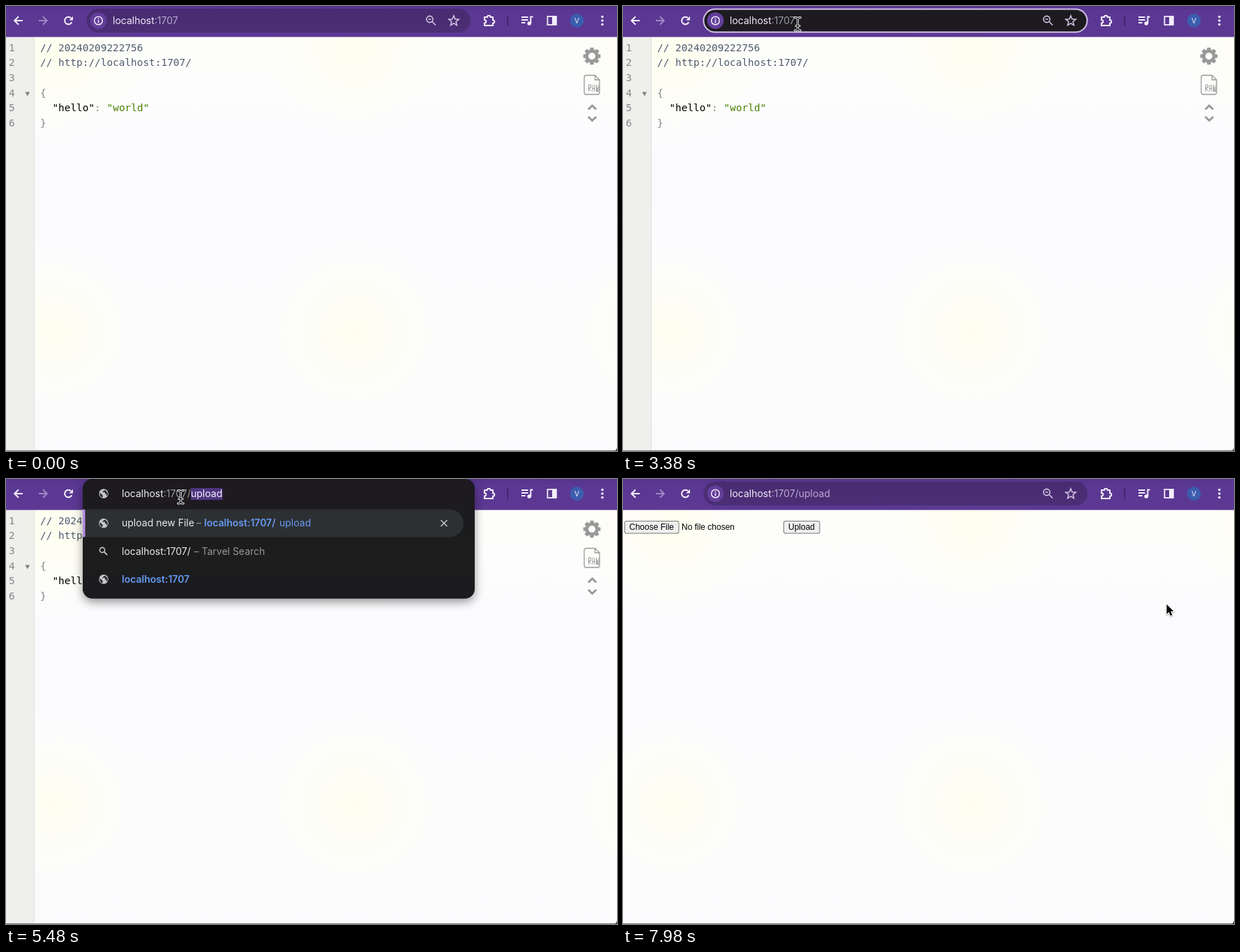
These frames come from a looping animation (876x639 px, 8000 ms). An HTML page with a canvas:

```html
<!DOCTYPE html>
<html lang="en">
<head>
<meta charset="utf-8">
<title>Upload page</title>
<style>
html, body { margin: 0; width: 100%; height: 100%; overflow: hidden; background: #fcfcfe; }
canvas { display: block; }
</style>
</head>
<body>
<canvas id="stage" width="876" height="639"></canvas>
<script>
const W = 876, H = 639, LOOP = 8000;
const CLICK = 1540, TYPE = 4570, ENTER = 6220, LOAD = 6480;
const UI = '14px Inter, sans-serif';
const UI_BOLD = '600 14px Inter, sans-serif';
const CODE = '14.42px "DejaVu Sans Mono", monospace';
const FORM = '12px "Liberation Sans", Arial, sans-serif';
const screen = document.getElementById('stage').getContext('2d');
let ctx = screen;

const clamp = v => Math.max(0, Math.min(1, v));
const ease = v => { v = clamp(v); return v * v * (3 - 2 * v); };
const mix = (a, b, p) => a + (b - a) * p;

function text(str, x, y, color, font) {
  ctx.font = font;
  ctx.fillStyle = color;
  ctx.fillText(str, x, y);
}
function rect(x, y, w, h, color) {
  ctx.fillStyle = color;
  ctx.fillRect(x, y, w, h);
}
function box(x, y, w, h, r, color) {
  ctx.fillStyle = color;
  ctx.beginPath();
  ctx.roundRect(x, y, w, h, r);
  ctx.fill();
}
function disc(x, y, r, color) {
  ctx.fillStyle = color;
  ctx.beginPath();
  ctx.arc(x, y, r, 0, 7);
  ctx.fill();
}
function line(d, color, width = 1.8) {
  ctx.strokeStyle = color;
  ctx.lineWidth = width;
  ctx.stroke(new Path2D(d));
}
function shape(d, color) {
  ctx.fillStyle = color;
  ctx.fill(new Path2D(d));
}
function ring(x, y, r, color, width) {
  ctx.strokeStyle = color;
  ctx.lineWidth = width;
  ctx.beginPath();
  ctx.arc(x, y, r, 0, 7);
  ctx.stroke();
}
function fadeY(y0, y1, stops) {
  const g = ctx.createLinearGradient(0, y0, 0, y1);
  stops.forEach(([at, color]) => g.addColorStop(at, color));
  return g;
}

function backdrop() {
  rect(0, 44, W, H - 44, fadeY(44, H, [[0, '#fefefb'], [.3, '#fbfbff'], [.72, '#fcfcfd'], [1, '#fbfbfd']]));
  for (const [x, y, r] of [[70, 465, 120], [500, 465, 130], [930, 465, 120], [500, 60, 130], [70, 70, 130], [930, 70, 120]]) {
    const g = ctx.createRadialGradient(x, y, 0, x, y, r);
    g.addColorStop(0, 'rgba(255,255,236,.8)');
    g.addColorStop(1, 'rgba(255,255,240,0)');
    ctx.fillStyle = g;
    ctx.fillRect(x - r, Math.max(44, y - r), 2 * r, 2 * r);
  }
}

function gear(x, y) {
  ctx.beginPath();
  for (let i = 0; i < 8; i++) {
    const a = i * Math.PI / 4;
    for (const [da, r] of [[-.3, 9.7], [-.2, 12.6], [.2, 12.6], [.3, 9.7]])
      ctx.lineTo(x + r * Math.cos(a + da), y + r * Math.sin(a + da));
  }
  ctx.closePath();
  ctx.moveTo(x + 5, y);
  ctx.arc(x, y, 5, 0, 7);
  ctx.fillStyle = '#999';
  ctx.fill('evenodd');
}

function jsonPage() {
  rect(0, 44, 40, H - 44, 'rgba(235,235,232,.72)');
  rect(40, 44, 1, H - 44, '#dddddf');
  const row = i => 64.6 + i * 21.72;
  for (let i = 0; i < 6; i++) text(String(i + 1), 4, row(i), '#85858a', CODE);
  shape('M27.5 123.5h6.6l-3.3 6z', '#808080');
  text('// 20240209222756', 49, row(0), '#4f5b6f', CODE);
  text('// http://localhost:1707/', 49, row(1), '#4f5b6f', CODE);
  text('{', 49, row(3), '#858585', CODE);
  text('"hello"', 66.4, row(4), '#000', CODE);
  text(':', 127, row(4), '#858585', CODE);
  text('"world"', 144.6, row(4), '#4a8000', CODE);
  text('}', 49, row(5), '#858585', CODE);

  gear(840, 72);
  line('M832 99.5h12.5l6.5 6.5v18a3 3 0 0 1-3 3h-16a3 3 0 0 1-3-3v-21.500a3 3 0 0 1 3-3M844.500 99.500v6.500h6.500', '#999', 1.3);
  line('M835.500 122.500v-9.500h3v4.500h-3l3.500 5M841 122.500v-8l1.500-1.500l1.500 1.500v8M841 118.500h3M846.500 113v9.500h1.500v-6v6h2v-9.500', '#999', 1);
  line('M834.8 148.500l5.700-5.500l5.700 5.500M834.800 159l5.700 5.500l5.700-5.500', '#999', 3);
}

function button(label, x, w) {
  box(x, 60, w, 18.5, 3, '#767676');
  box(x + 1, 61, w - 2, 16.5, 2, '#efefef');
  text(label, x + 7, 73.4, '#000', FORM);
}

function uploadPage() {
  button('Choose File', 2, 78.500);
  text('No file chosen', 84, 73.4, '#000', FORM);
  button('Upload', 230, 52.5);
}

function globe(x, y) {
  disc(x, y, 6.7, '#c6c6ca');
  ctx.save();
  ctx.translate(x, y);
  shape('M-5.300-1.500l3.800 3.800v3.200c-3-.600-4.500-3.500-3.800-7zM1-5.200c0 2-2.500 1-2.500 3.200h3.500v2.500h2v2.500l1 .600c1.800-3 .300-7.300-4-8.800z', '#26252a');
  ctx.restore();
}

function drawPopup() {
  ctx.save();
  ctx.shadowColor = 'rgba(0,0,0,.42)';
  ctx.shadowBlur = 14;
  ctx.shadowOffsetY = 5;
  box(110, 0, 562, 171.5, 14, '#1c1b20');
  ctx.restore();
  box(110, 0, 562, 171.5, 14, fadeY(0, 172, [[0, '#1c1a20'], [.7, '#1c1d1c'], [1, '#1b1a20']]));
  box(113, 43.5, 543, 40, [0, 20, 20, 0], '#2d3032');
  box(110, 43.5, 3.5, 40, [0, 2, 2, 0], '#b78ee2');
  globe(140, 63.5);
  text('upload new File', 166, 68.3, '#e9e9eb', UI);
  text('–', 273, 68.3, '#97979b', UI);
  text('localhost:1707/', 284, 68.3, '#659bf3', UI_BOLD);
  text('upload', 392, 68.3, '#659bf3', UI);
  line('M623.500 59l9 9m0-9l-9 9', '#c6c6ca', 1.5);
  ring(138, 102, 3.6, '#c6c6ca', 1.6);
  line('M140.700 104.700l4.300 4.300', '#c6c6ca', 1.8);
  text('localhost:1707/', 166, 108.5, '#e9e9eb', UI);
  text('– Tarvel Search', 269.500, 108.5, '#97979b', UI);
  globe(140, 144);
  text('localhost:1707', 166, 148.8, '#659bf3', UI_BOLD);
}

function toolbarIcons(loading) {
  const white = '#f4eefb';
  line('M24 21h-11.500M18 15.200l-5.800 5.800l5.800 5.800', white, 2);
  line('M47 21h11.500M53 15.200l5.800 5.800l-5.800 5.800', '#a086c6', 2);
  if (loading) {
    line('M84.700 16.500l9.300 9.300m0-9.300l-9.300 9.300', white, 2);
  } else {
    ctx.strokeStyle = white;
    ctx.lineWidth = 2;
    ctx.beginPath();
    ctx.arc(89.500, 21, 5.3, .45, 5.45);
    ctx.stroke();
    shape('M96 14.800v5.700h-5.700z', white);
  }
  line('M686 16h4a2.300 2.300 0 0 1 4.600 0h3.400v4.200a2.300 2.300 0 0 1 0 4.600v3.200h-12v-3.400a2.300 2.300 0 0 0 0-4.600z', white, 2);
  rect(718.500, 14, 1.500, 15, '#37215f');
  line('M739 16h9.500M739 20h9.500M739 24h5.500M752.300 25v-9.500h3.200', white, 2);
  disc(750.200, 25, 2.800, white);
  ctx.strokeStyle = white;
  ctx.lineWidth = 1.8;
  ctx.strokeRect(776.400, 15, 12.500, 12);
  rect(783, 15, 6, 12, white);
  disc(818.500, 21, 10, '#3c5cae');
  ctx.textAlign = 'center';
  text('V', 818.500, 25, '#e4e8f6', '11px Roboto, sans-serif');
  ctx.textAlign = 'left';
  for (const y of [15.5, 21, 26.5]) disc(855, y, 1.800, white);
}

function star(x, y) {
  ctx.beginPath();
  for (let i = 0; i < 10; i++) {
    const a = i * Math.PI / 5 - Math.PI / 2, r = i % 2 ? 3.3 : 7.6;
    ctx.lineTo(x + r * Math.cos(a), y + r * Math.sin(a));
  }
  ctx.closePath();
  ctx.strokeStyle = '#d4c8e4';
  ctx.lineWidth = 1.500;
  ctx.stroke();
}

function addressBar(t, popupAlpha) {
  const focused = t >= CLICK && t < TYPE;
  const typed = t >= TYPE && t < ENTER;
  const dark = '#1d1b20';
  const pill = fadeY(4, 38, [[0, '#482b70'], [1, '#4b2e75']]);
  if (focused) {
    box(114.500, 3.5, 552, 35, 17.500, '#d3c2e8');
    box(116.500, 5.5, 548, 31, 15.500, dark);
  } else if (typed) {
    box(115.500, 4, 550.500, 34, 17, dark);
  } else if (popupAlpha > 0) {
    box(118, 5.5, 546, 31, 15.500, '#523285');
  } else {
    box(115.500, 4, 550.500, 34, 17, pill);
  }

  if (typed) {
    globe(140, 21);
    rect(265, 13, 45.500, 17, '#4f3580');
    text('localhost', 166, 26, '#ececee', UI);
    const x = 166 + ctx.measureText('localhost').width;
    text(':1707/', x, 26, '#98989c', UI);
    text('upload', 265, 26, '#f4f2f8', UI);
    return;
  }
  disc(132.500, 21, 12, '#623e99');
  ring(132.500, 21, 5.800, '#f0eaf8', 1.500);
  rect(131.700, 20.300, 1.600, 4, '#f0eaf8');
  rect(131.700, 17.600, 1.600, 1.600, '#f0eaf8');
  text('localhost', 153, 26, '#f0eaf8', UI);
  const x = 153 + ctx.measureText('localhost').width;
  text(t >= ENTER ? ':1707/upload' : ':1707', x, 26, focused ? '#99979f' : '#b8a8d0', UI);
  if (focused && (t - CLICK) % 1000 < 500) rect(248.500, 13, 1.200, 17, '#ececee');
  ring(607.500, 19, 4.600, '#d4c8e4', 1.600);
  line('M605.500 19h4M611 22.500l5 5', '#d4c8e4', 1.600);
  star(642, 21.500);
}

function beam(x, y) {
  const d = 'M-3.800-9.500q3.300 0 3.800 2.200q.500-2.200 3.800-2.200M0-7.500v14.500M-3.800 9q3.300 0 3.800-2.200q.500 2.200 3.800 2.200M-2.500 2.500h5';
  ctx.save();
  ctx.translate(x, y);
  ctx.lineCap = 'round';
  line(d, '#fff', 3);
  line(d, '#000', 1.200);
  ctx.restore();
}

function arrow(x, y) {
  const d = 'M0 0v14l3.200-3l2.200 5.200l2.500-1l-2.200-5.100h4.300z';
  ctx.save();
  ctx.translate(x, y);
  ctx.lineJoin = 'round';
  ctx.shadowColor = 'rgba(0,0,0,.35)';
  ctx.shadowBlur = 2;
  ctx.shadowOffsetY = 1;
  line(d, '#fff', 2);
  ctx.shadowColor = 'transparent';
  shape(d, '#000');
  ctx.restore();
}

function pointer(t) {
  if (t < 250) return;
  const leaving = t > 7240;
  const p = leaving ? ease((t - 7270) / 690) : ease((t - 250) / 1130);
  const x = leaving ? mix(250.500, 779.500, p) : mix(884, 250.500, p);
  const y = leaving ? mix(26, 180, p) : mix(220, 26, p);
  const overBar = x > 116 && x < 666 && y < 38;
  (overBar ? beam : arrow)(x, y);
}

const popup = document.createElement('canvas');
popup.width = W;
popup.height = 220;
ctx = popup.getContext('2d');
drawPopup();
ctx = screen;

function render(t) {
  backdrop();
  t < LOAD ? jsonPage() : uploadPage();
  rect(0, 0, W, 44.500, fadeY(0, 44, [[0, '#54348a'], [.2, '#5b3893'], [1, '#5c3893']]));
  toolbarIcons(t >= ENTER && t < LOAD);

  const alpha = t < ENTER ? clamp((t - TYPE) / 200) : clamp(1 - (t - ENTER) / 180);
  if (alpha > 0) {
    ctx.globalAlpha = alpha;
    ctx.drawImage(popup, 0, 0);
    ctx.globalAlpha = 1;
  }
  addressBar(t, alpha);
  rect(0, H - 1, W, 1, '#77767a');
  shape('M876 634v5h-5q4 0 5-5z', '#3a3a40');
  pointer(t);
}

const start = performance.now();
function tick() {
  render((performance.now() - start) % LOOP);
  requestAnimationFrame(tick);
}
tick();
</script>
</body>
</html>
```
